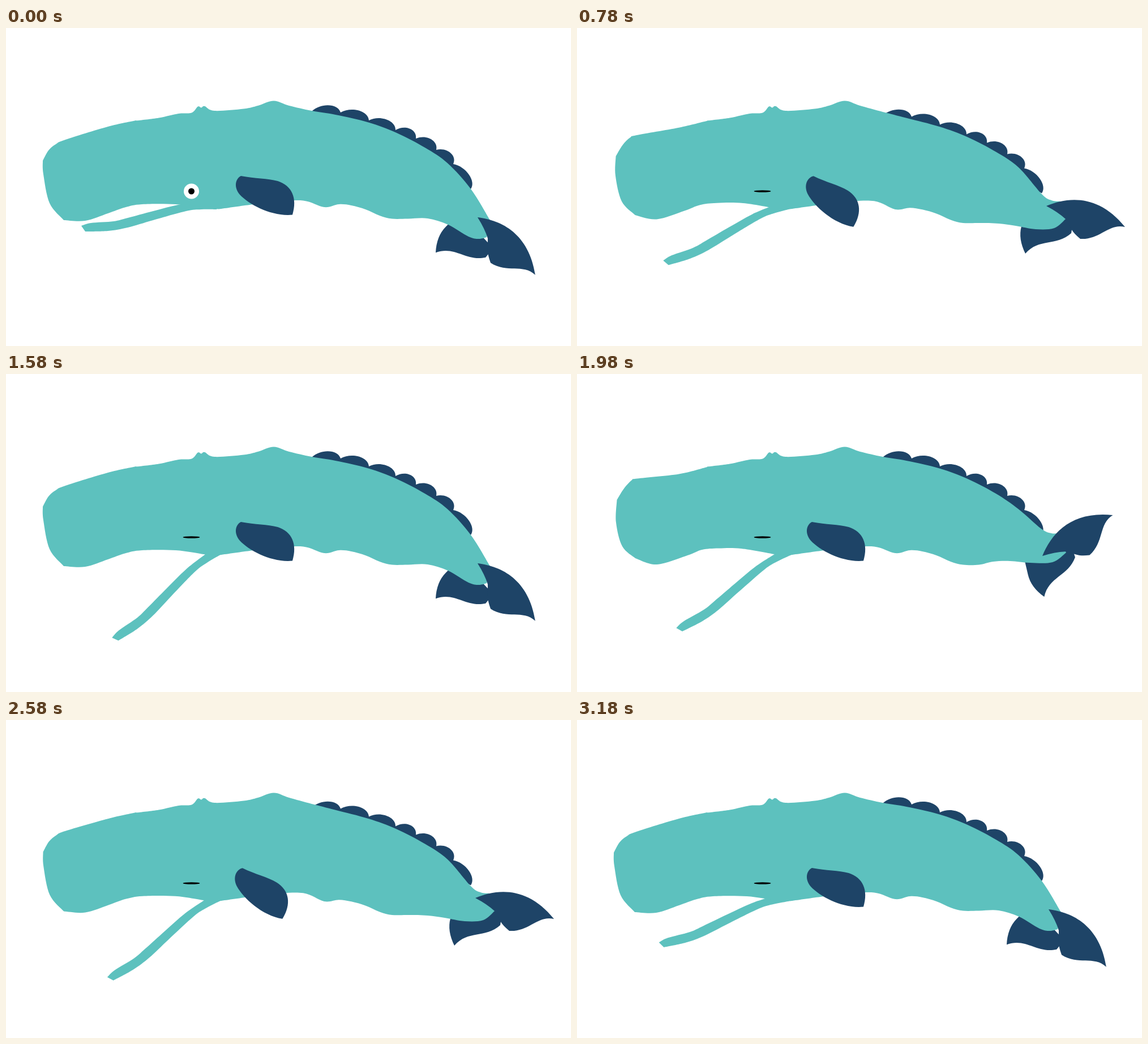
An HTML page with a canvas that plays this animation: 998 by 561 pixels, repeating every 3220 ms.

```html
<!DOCTYPE html>
<html lang="en">
<head>
<meta charset="utf-8">
<title>Whale</title>
<style>
html, body { margin: 0; width: 100%; height: 100%; overflow: hidden; background: #fff; }
canvas { display: block; }
</style>
</head>
<body>
<canvas id="stage" width="998" height="561"></canvas>
<script>
const ctx = document.getElementById('stage').getContext('2d');
const TEAL = '#5dc1be', NAVY = '#1e4467';
const LOOP = 3220, FIRST = 180, STEP = 200;

// Key points: "|" marks a corner between smooth runs.
const runs = text => text.split('|').map(run => run.split(',').map(p => p.split(' ').map(Number)));

const headLow = runs('349 318,300 311,240 311,210 316.5,180 327,140 340,102 339|102 339,77 309,66 258,65 234|65 234,75 216,88 205,105 197,180 174,230 163');
const headHigh = runs('349 318,290 308,250 307.5,221 310,195 320,141 336,103 325|103 325,80 304,69 262,70.5 222|70.5 222,83 202,97 187,106 184.5,180 176.5,230 164');
const [back] = runs('230 163.5,270 158.5,305 151,328 149.5,339 138.5,345 140.5,351 138,368 146,420 142.5,445 137,473 128.5,500 137,540 146,582 153,640 166.5,690 185,740 211,780 238.5');
const [belly] = runs('710 336.5,682 336.5,660 331,635 320,610 313,588 311,562 316,525 304.5,470 307,430 312,376 319.5');
const [valleys] = runs('540 147,591 149,641 163,688 180,724 195,760 215,790 240,821 284');
const jaw = runs('348 306,306 311.5,260 323,215 335,190 341,150 344,133 349|140 359,180 358,215 352,260 339,318 323,345 320,372 320|380 300');

const flipper = new Path2D('M415 261C440 266 462 265 480 270C505 278 515 300 506 329.5C470 333 430 312 413 294C402 281 405 266 415 261');
const nearFluke = new Path2D('M0 0C40 -17 93 -20 139 37C110 30 95 60 60 58Q48 48 45 42L34 23Q21 11 0 0');
const farFluke = new Path2D('M0 0L-1 6C-28 30 -58 14 -82 42Q-95 16 -89 -6L-80 -40L-11 -19L4 -14Z');

// head: blend of the two head shapes; sag: how far the rear back hangs;
// near, far: place and turn of each fluke; end: outline of the tail stem.
const low = {
  head: 0, sag: 0, flip: 0, lift: 0, near: [833, 334, 30], far: [851, 400, 29.5],
  end: runs('821 284,855 339|849 369,835 372,817 368,781 347,745 336')
};
const mid = {
  head: 0.1, sag: 7.5, flip: 14.8, lift: 3.4, near: [829, 314, 0], far: [874, 356, 0],
  end: runs('821 293,838 304,855 306|863 337,843 353,810 355,775 349,745 345')
};
const high = {
  head: 1, sag: 0, flip: 0, lift: 5, near: [822, 321, -45], far: [878, 317.5, -28],
  end: runs('820 273,838 281,850 281|864 315,840 332,800 333,765 330,735 331')
};
const gape = { ...mid, head: 0.65 };
const poses = { L: low, M: mid, H: high, G: gape };
const order = 'LMHMGHGMLMHMLMHML';

const mix = (a, b, k) => a + (b - a) * k;
const smooth = x => { x = Math.min(1, Math.max(0, x)); return x * x * (3 - 2 * x); };

function outline(parts) {
  const path = new Path2D();
  for (const pts of parts) {
    path.lineTo(...pts[0]);
    for (let i = 1; i < pts.length; i++) {
      const a = pts[i - 1], b = pts[i];
      const before = pts[i - 2] || a, after = pts[i + 1] || b;
      path.bezierCurveTo(
        a[0] + (b[0] - before[0]) / 6, a[1] + (b[1] - before[1]) / 6,
        b[0] - (after[0] - a[0]) / 6, b[1] - (after[1] - a[1]) / 6, ...b);
    }
  }
  path.closePath();
  return path;
}

// Fill a path moved to x, y and turned about its own point cx, cy.
function place(color, path, x = 0, y = 0, degrees = 0, cx = 0, cy = 0) {
  ctx.save();
  ctx.translate(x, y);
  ctx.rotate(degrees * Math.PI / 180);
  ctx.translate(-cx, -cy);
  ctx.fillStyle = color;
  ctx.fill(path);
  ctx.restore();
}

function scallops() {
  const path = new Path2D();
  path.moveTo(...valleys[0]);
  valleys.slice(1).forEach(([x, y], i) => {
    const [x0, y0] = valleys[i], dx = x - x0, dy = y - y0;
    const rise = 16 / Math.hypot(dx, dy);
    const bulge = k => [x0 + dx * k + dy * rise, y0 + dy * k - dx * rise];
    path.bezierCurveTo(...bulge(0.3), ...bulge(0.9), x, y);
  });
  return path;
}

function body(pose) {
  const head = headLow.map((run, r) => run.map((p, i) =>
    p.map((v, axis) => mix(v, headHigh[r][i][axis], pose.head))));
  const hang = ([x, y]) => [x, y + pose.sag * smooth((x - 500) / 120)];
  const [top, under] = pose.end;
  return outline([...head, [...back.map(hang), ...top], [...under, ...belly.map(hang)]]);
}

function eye(lid) {
  const oval = (color, rx, ry) => {
    const path = new Path2D();
    path.ellipse(327.5, 288, rx, ry, 0, 0, Math.PI * 2);
    place(color, path);
  };
  if (lid <= 0) return oval('#000', 15, 1.8);
  oval('#fff', 13.5, 13.5 * lid);
  oval('#000', 5.5, 5.5 * lid);
}

function draw(n) {
  const pose = poses[order[n]];
  const last = n === order.length - 1;
  const open = last ? 0.35 : smooth((n - 1.5) / 5);
  const turn = 30.5 * open - (open === 1 ? pose.lift : 0);
  ctx.clearRect(0, 0, 998, 561);
  place(NAVY, scallops(), 0, pose.sag);
  place(NAVY, farFluke, ...pose.far);
  place(TEAL, outline(jaw), 372 + 6.5 * open, 320 - open, -turn, 372, 320);
  place(TEAL, body(pose));
  place(NAVY, nearFluke, ...pose.near);
  place(NAVY, flipper, 415, 272, pose.flip, 415, 272);
  eye(1 - n / 4);
}

function tick() {
  const t = performance.now() % LOOP;
  draw(Math.max(0, 1 + Math.floor((t - FIRST) / STEP)));
  requestAnimationFrame(tick);
}
tick();
</script>
</body>
</html>
```
